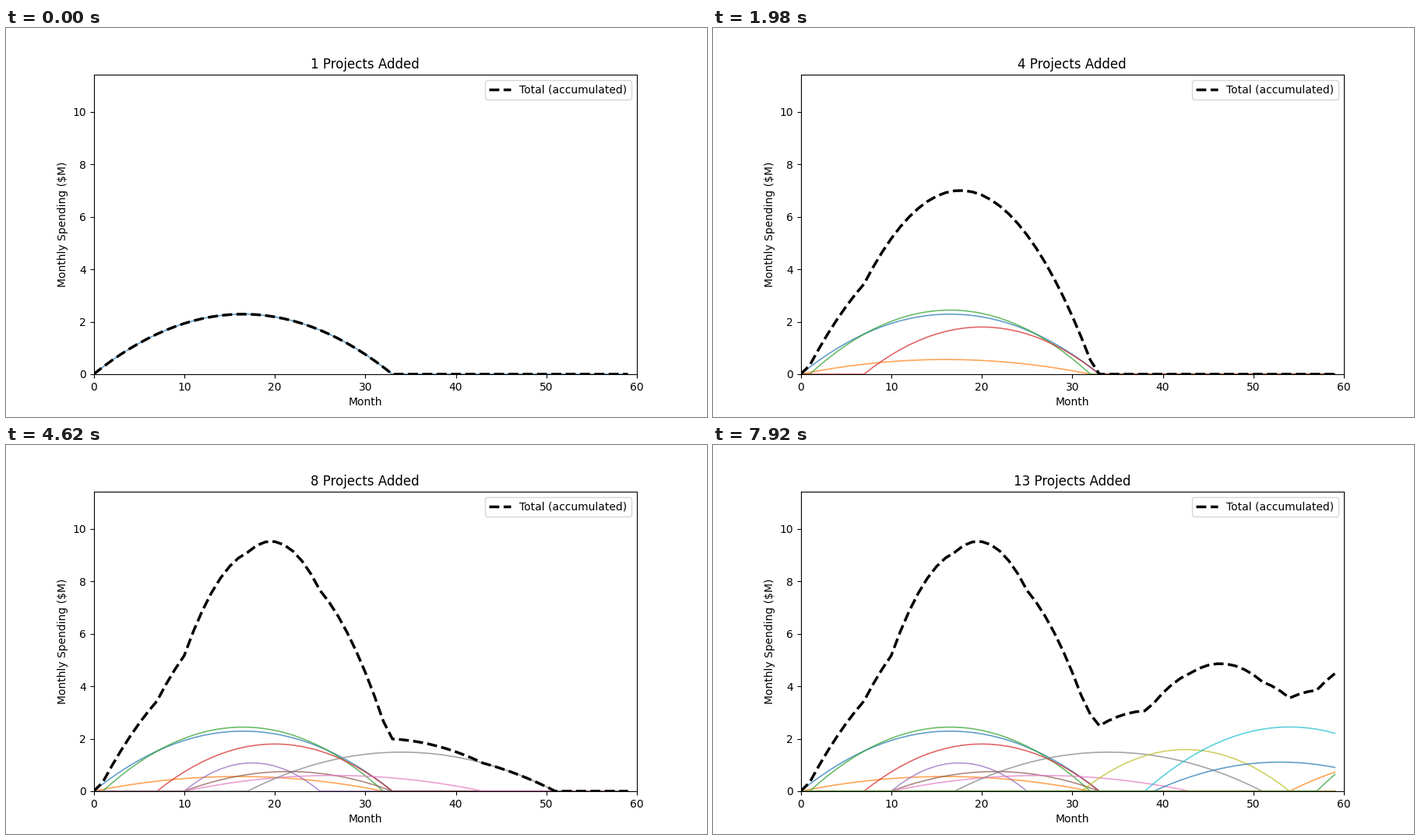
Recreate the animation shown at these times as a matplotlib script. Size 900 by 500 pixels, loop 8580 ms.

```python
import matplotlib.pyplot as plt
import numpy as np
from matplotlib.animation import FuncAnimation

STEP_MS = 660
MONTHS = np.arange(60)


def spending(start, peak, length=32):
    """Parabola over the project's months, zero outside them."""
    x = (MONTHS - start) / length
    return np.maximum(4 * peak * x * (1 - x), 0)


# start month, peak and, where it is not typical, length in months
projects = [
    (0, 2.29, 33), (0, 0.56), (1, 2.445, 31), (7, 1.8, 26),
    (10, 1.08, 15), (10, 0.75, 23), (10, 0.6, 33), (17, 1.49, 34),
    (31, 1.59, 23), (38, 2.45), (39, 1.11, 28), (54, 1.38), (57, 2.73),
]
curves = np.array([spending(*p) for p in projects])
totals = curves.cumsum(axis=0)

fig, ax = plt.subplots(figsize=(9, 5), dpi=100)
lines = [ax.plot(MONTHS, c, lw=1.2, alpha=0.7)[0] for c in curves]
total, = ax.plot(MONTHS, totals[0], "k--", lw=2.5, label="Total (accumulated)")
ax.set_xlim(0, 60)
ax.set_ylim(0, 1.2 * totals.max())
ax.set_xlabel("Month")
ax.set_ylabel("Monthly Spending ($M)")
ax.legend(loc="upper right")


def draw(i):
    for k, line in enumerate(lines):
        line.set_visible(k <= i)
    total.set_ydata(totals[i])
    ax.set_title(f"{i + 1} Projects Added")


anim = FuncAnimation(fig, draw, frames=len(projects), interval=STEP_MS,
                     repeat=True, repeat_delay=0)
plt.show()
```
